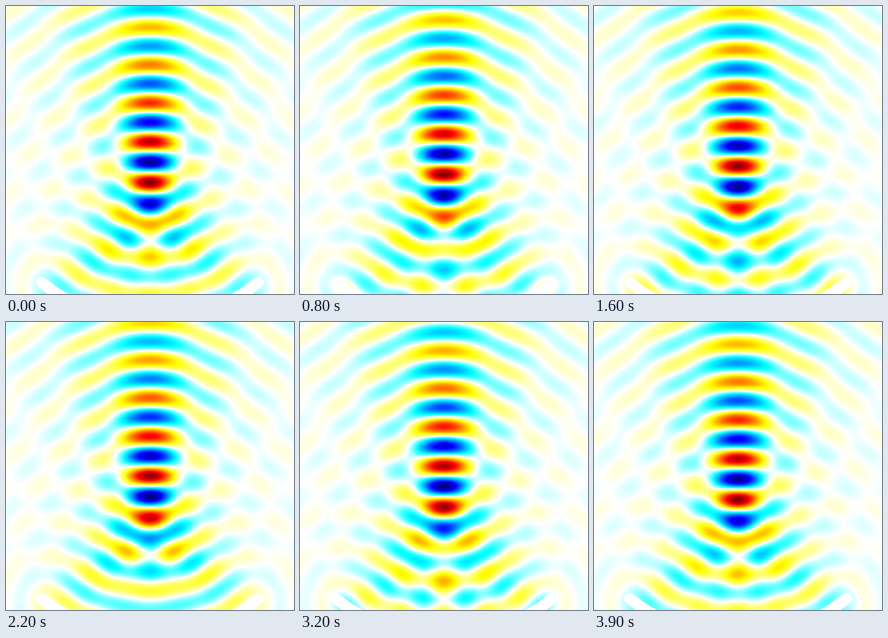
A matplotlib script for the animation above (4 s loop, 360x360 px).

```python
import numpy as np
import matplotlib.pyplot as plt
from matplotlib.animation import FuncAnimation
from matplotlib.colors import LinearSegmentedColormap

SIZE = 360
FRAMES = 40
INTERVAL = 100

# Concave bowl radiating upwards, in pixels with y pointing down
WAVELENGTH = 44.7
K = 2 * np.pi / WAVELENGTH
RADIUS = 215.0
RIM_X = 135.0
CENTER_Y = 178.6
RIM_ANGLE = np.arcsin(RIM_X / RADIUS)
START_PATH = 178.4  # distance travelled by a crest at time zero
SPACING = 5.0       # between point sources
MASK = 7.0          # half width of the blank strip along the bowl


def bowl_points():
    """Point sources on half of the bowl, as (x, y, z, weight)."""
    rings = int(np.ceil(RADIUS * RIM_ANGLE / SPACING))
    step = RIM_ANGLE / rings
    for angle in (np.arange(rings) + 0.5) * step:
        rho = RADIUS * np.sin(angle)
        y = CENTER_Y + RADIUS * np.cos(angle)
        count = int(np.ceil(np.pi * rho / SPACING))
        for turn in (np.arange(count) + 0.5) * np.pi / count:
            yield rho * np.cos(turn), y, rho * np.sin(turn), rho * step / count


def half_field(x, y):
    """Sum of spherical waves on the grid spanned by x and y."""
    real = np.zeros((y.size, x.size), np.float32)
    imag = np.zeros_like(real)
    for px, py, pz, weight in bowl_points():
        dx2 = ((x - px) ** 2).astype(np.float32)
        dy2 = ((y - py) ** 2 + pz ** 2).astype(np.float32)
        r = np.sqrt(dx2[None, :] + dy2[:, None])
        phase = np.float32(K) * r
        gain = np.float32(weight) / r
        real += gain * np.cos(phase)
        imag += gain * np.sin(phase)
    return real + 1j * imag


def near_bowl(x, y):
    """True where a grid point lies on the strip along the bowl."""
    gx, gy = np.meshgrid(x, y - CENTER_Y)
    angle = np.clip(np.arctan2(gx, gy), -RIM_ANGLE, RIM_ANGLE)
    gap = np.hypot(gx - RADIUS * np.sin(angle), gy - RADIUS * np.cos(angle))
    return gap < MASK


def mirrored(half):
    return np.hstack([half[:, ::-1], half])


xs = np.arange(SIZE // 2) + 0.5
ys = np.arange(SIZE) + 0.5
wave = half_field(xs, ys)
wave *= np.exp(-1j * K * START_PATH) / np.abs(wave[:, 0]).max()
wave[near_bowl(xs, ys)] = 0
wave = mirrored(wave)

white_jet = LinearSegmentedColormap.from_list("white_jet", [
    (0.0, (0, 0, 0.5)),
    (0.125, (0, 0, 1)),
    (0.375, (0, 1, 1)),
    (0.5, (1, 1, 1)),
    (0.625, (1, 1, 0)),
    (0.875, (1, 0, 0)),
    (1.0, (0.5, 0, 0)),
], N=513)

fig = plt.figure(figsize=(SIZE / 100, SIZE / 100), dpi=100)
ax = fig.add_axes([0, 0, 1, 1])
ax.axis("off")
image = ax.imshow(wave.real, cmap=white_jet, vmin=-1, vmax=1,
                  interpolation="nearest", aspect="auto")


def update(frame):
    turn = np.exp(-2j * np.pi * frame / FRAMES)
    image.set_data((wave * turn).real)
    return [image]


anim = FuncAnimation(fig, update, frames=FRAMES, interval=INTERVAL,
                     repeat=True, repeat_delay=0, blit=False)
plt.show()
```
